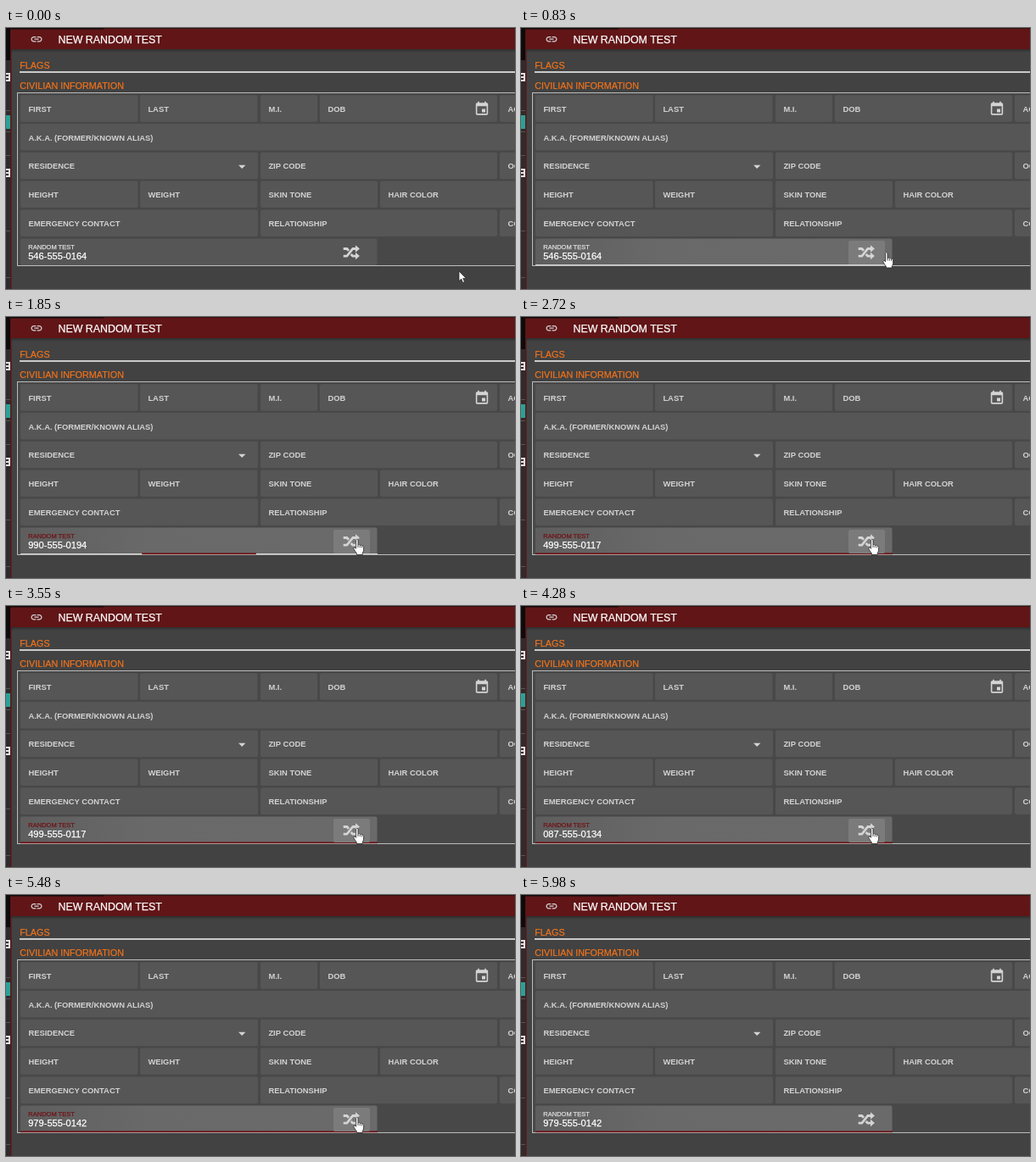
Animation of 600 by 308 pixels, one loop 6040 ms. Source, as an HTML page:

```html
<!DOCTYPE html>
<html lang="en">
<head>
<meta charset="utf-8">
<title>Random test form</title>
<style>
html, body { margin: 0; width: 100%; height: 100%; overflow: hidden; background: #424242; }
svg { display: block; width: 600px; height: 308px; font-family: "Liberation Sans", Arial, sans-serif; }
.label { font-size: 9.4px; font-weight: bold; fill: #d2d2d2; }
.section { font-size: 10.8px; fill: #f4731a; stroke: #f4731a; stroke-width: .2; }
.bright { fill: #fff; stroke: #fff; stroke-width: .25; }
.icon { fill: #d4d4d4; }
</style>
</head>
<body>
<svg id="stage" viewBox="0 0 600 308">
  <defs>
    <linearGradient id="lit">
      <stop offset="0" stop-color="#5e5e5e"/>
      <stop offset=".35" stop-color="#696969"/>
      <stop offset="1" stop-color="#6a6a6a"/>
    </linearGradient>
    <linearGradient id="shade" x2="0" y2="1">
      <stop offset="0" stop-color="#000" stop-opacity=".3"/>
      <stop offset="1" stop-color="#000" stop-opacity="0"/>
    </linearGradient>
  </defs>

  <!-- page behind the dialog -->
  <rect width="6" height="308" fill="#2f2b2c"/>
  <rect width="6" height="38" fill="#0d0b0b"/>
  <path d="M0 97.5h5M0 122.5h5M0 150.5h5M0 239.5h5M0 294.5h5" stroke="#555"/>
  <rect y="103" width="5" height="16" fill="#2aa197"/>
  <path d="M0 53h5v2H0zM0 57h5v2H0zM0 61h5v2H0zM0 166h5v2H0zM0 170h5v2H0zM0 174h5v2H0zM3 53h2v10H3zM3 166h2v10H3z" fill="#e0e0e0"/>

  <!-- dialog -->
  <rect x="6" width="594" height="308" fill="#424242"/>
  <rect x="5" width="1.5" height="308" fill="#5a1518"/>
  <rect x="6" y="1" width="594" height="24" fill="#611517"/>
  <rect x="6" width="594" height="1" fill="#35100f"/>
  <rect width="115" height="1.5" fill="#120a0a"/>
  <rect x="6" y="25" width="594" height="4" fill="url(#shade)"/>
  <path class="icon" transform="translate(28.2 5.4) scale(.65)" d="M3.9 12c0-1.71 1.39-3.1 3.1-3.1h4V7H7c-2.76 0-5 2.24-5 5s2.24 5 5 5h4v-1.9H7c-1.71 0-3.1-1.39-3.1-3.1zM8 13h8v-2H8zM17 7h-4v1.9h4c1.71 0 3.1 1.39 3.1 3.1s-1.39 3.1-3.1 3.1h-4V17h4c2.76 0 5-2.24 5-5s-2.24-5-5-5z"/>
  <text class="bright" x="61.5" y="17.8" font-size="12.4">NEW RANDOM TEST</text>
  <text class="section" x="16.2" y="47.6">FLAGS</text>
  <rect x="16" y="51.2" width="584" height="1.6" fill="#ececec"/>
  <text class="section" x="16.2" y="71.8">CIVILIAN INFORMATION</text>
  <rect x="13.5" y="76.5" width="600" height="204" fill="#484848" stroke="#bdbdbd"/>
  <g id="fields"></g>
  <path class="icon" transform="translate(551.4 85.9) scale(.8)" d="M17 12h-5v5h5zM16 1v2H8V1H6v2H5c-1.1 0-2 .9-2 2v14c0 1.1.9 2 2 2h14c1.1 0 2-.9 2-2V5c0-1.1-.9-2-2-2h-1V1zM19 19H5V8h14z"/>
  <path class="icon" d="M274 161.8h8.4l-4.2 4.2z"/>

  <!-- random number field -->
  <rect id="box" x="17" y="248.5" width="420.5" height="31.5" rx="2"/>
  <rect id="base" x="17" y="279" width="421" height="1" fill="#d0d0d0"/>
  <rect id="line" y="278.4" height="1.8" fill="#6e1418"/>
  <text id="caption" x="26.3" y="261" font-size="7.5" stroke-width=".25">RANDOM TEST</text>
  <text id="number" class="bright" x="26.2" y="273.3" font-size="11.1"></text>
  <rect id="button" x="386" y="251" width="43" height="28" rx="2" fill="#7b7b7b"/>
  <path class="icon" transform="translate(395.8 253.4) scale(.95)" d="M17 3l5.25 4.5L17 12V9h-2.74L7 18H2v-3h3.74L13 6h4zM2 6h5l2.7 2.7-2.1 2.1L5.74 9H2zM17 12l5.25 4.5L17 21v-3h-4l-2.7-2.7 2.1-2.1L14.26 15H17z"/>

  <g id="cursor" stroke-linejoin="round">
    <path id="arrow" d="M0 0v11.6l2.7-2.5 1.8 4.3 2-.9-1.8-4.1h3.6z" fill="#fff" stroke="#222" stroke-width=".7"/>
    <path id="hand" d="M-1.2 1.2Q0-.9 1.2 1.2V7Q2.7 5.8 3.5 7.4 5 6.5 5.7 8 7.5 7.4 7.8 9.2V13Q7.7 15 6.5 16.2V18.5H-.5V16.8Q-2.3 14.6-4 11.4-3.8 9.4-2 10.3L-1.2 11.3Z M1.2 7v3M3.5 7.6v2.6M5.7 8.4v2" fill="#fff" stroke="#222" stroke-width=".8"/>
  </g>
</svg>
<script>
const LOOP = 6040, FOCUS = 1810, LEAVE = 5870;
const byId = id => document.getElementById(id);
const [box, base, line, caption, number, button, cursor, arrow, hand] =
  ["box", "base", "line", "caption", "number", "button", "cursor", "arrow", "hand"].map(byId);

// each row: x, width, label
const rows = [
  [[17, 138.5, "FIRST"], [158, 138.5, "LAST"], [300, 67, "M.I."], [370, 209, "DOB"], [582, 40, "AGE"]],
  [[17, 600, "A.K.A. (FORMER/KNOWN ALIAS)"]],
  [[17, 280, "RESIDENCE"], [300, 279, "ZIP CODE"], [582, 40, "OCCUPATION"]],
  [[17, 138.5, "HEIGHT"], [158, 138.5, "WEIGHT"], [300, 138, "SKIN TONE"], [441, 180, "HAIR COLOR"]],
  [[17, 280, "EMERGENCY CONTACT"], [300, 279, "RELATIONSHIP"], [582, 40, "CONTACT"]]
];
byId("fields").innerHTML = rows.map((row, i) => {
  const y = 79.2 + i * 33.8;
  return row.map(([x, w, label]) =>
    `<rect x="${x}" y="${y}" width="${w}" height="31.5" rx="2" fill="#565656"/>` +
    `<text class="label" x="${x + 9.4}" y="${y + 19.5}">${label}</text>`).join("");
}).join("");

const draws = [
  [0, "546-555-0164"], [FOCUS, "990-555-0194"], [2450, "499-555-0117"],
  [3650, "087-555-0134"], [4650, "115-555-0158"], [5450, "979-555-0142"]
];
const path = [[0, 534, 287], [250, 534, 287], [830, 431, 264.5], [1100, 413.8, 262]];

const clamp = v => Math.max(0, Math.min(1, v));
const easeOut = v => 1 - (1 - clamp(v)) ** 3;

function pointer(t) {
  for (let i = 1; i < path.length; i++) {
    const [t0, x0, y0] = path[i - 1], [t1, x1, y1] = path[i];
    if (t < t1) {
      const k = easeOut((t - t0) / (t1 - t0));
      return [x0 + (x1 - x0) * k, y0 + (y1 - y0) * k];
    }
  }
  return path[path.length - 1].slice(1);
}

const show = (el, on) => el.setAttribute("visibility", on ? "visible" : "hidden");

function draw(t) {
  const [x, y] = pointer(t);
  const present = t < LEAVE;
  const over = present && x < 438 && y < 280;
  const focused = t >= FOCUS && present;

  cursor.setAttribute("transform", `translate(${x} ${y})`);
  show(arrow, present && !over);
  show(hand, over);
  show(button, present && x < 432);
  show(base, over);

  box.setAttribute("fill", over || t >= FOCUS ? "url(#lit)" : "#565656");
  const tint = focused ? "#701418" : "#dedede";
  caption.setAttribute("fill", tint);
  caption.setAttribute("stroke", tint);

  const w = 421 * easeOut((t - FOCUS) / 340);
  line.setAttribute("x", 227.5 - w / 2);
  line.setAttribute("width", w);

  number.textContent = draws.filter(d => d[0] <= t).pop()[1];
}

const start = performance.now();
function tick() {
  draw((performance.now() - start) % LOOP);
  requestAnimationFrame(tick);
}
tick();
</script>
</body>
</html>
```
